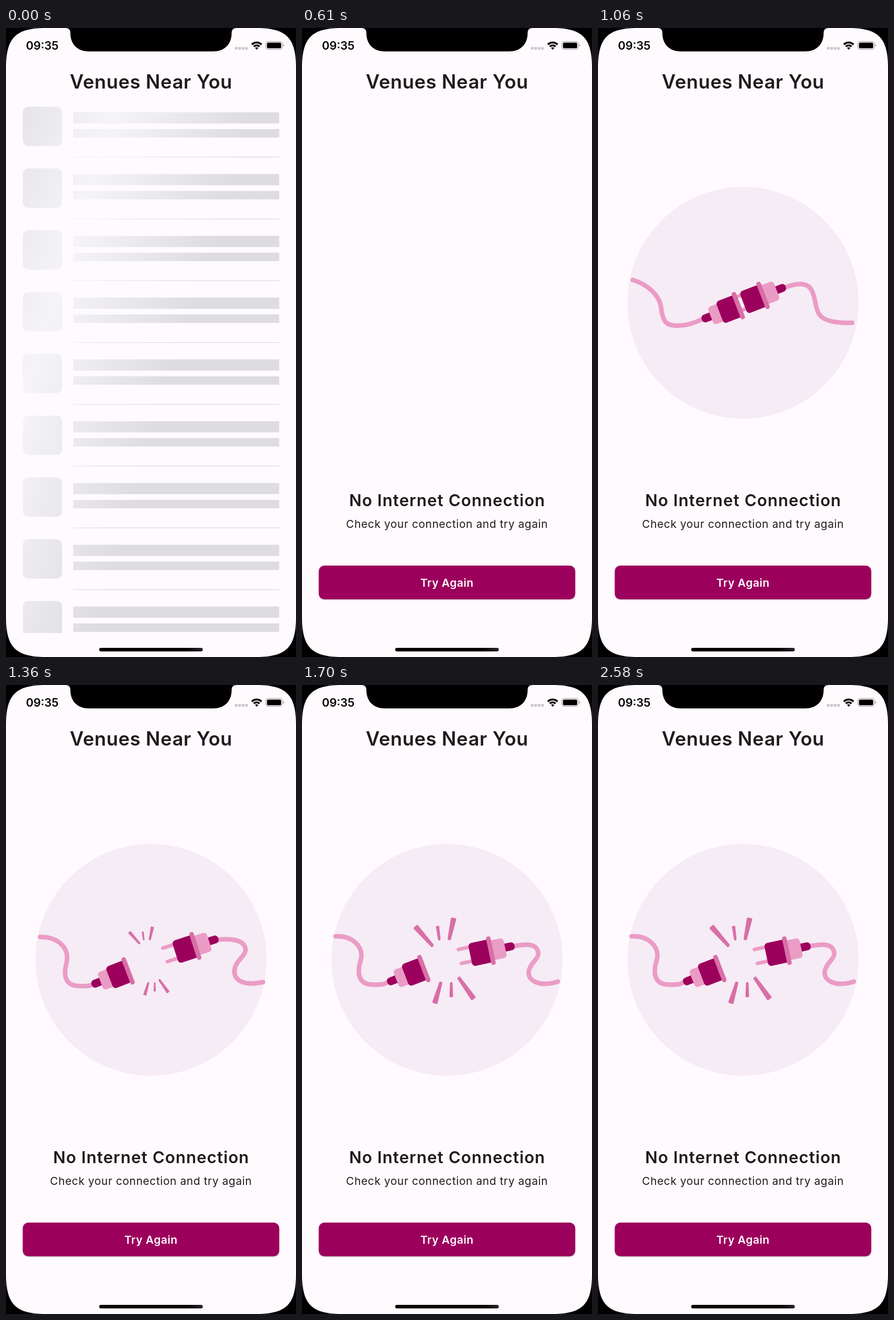
Write an HTML page that moves like this. It is 509x1101 px and loops after 2.67 s.

```html
<!DOCTYPE html>
<html lang="en">
<head>
<meta charset="utf-8">
<title>Venues</title>
<style>
  html, body { margin: 0; width: 100%; height: 100%; overflow: hidden; background: #000; }
  svg { display: block; width: 100%; height: 100%; }
  text { font-family: Inter, Roboto, sans-serif; font-optical-sizing: none; font-weight: 600; fill: #1f1a1d; }
  .mid { text-anchor: middle; }
  .dark { fill: #9c005d; }
  .light { fill: #ea9cc5; }
  .rose { fill: #d86fa7; }
  .cable { fill: none; stroke: #ea9cc5; stroke-width: 8; stroke-linecap: round; }
  .button { filter: drop-shadow(0 1.3px 1.3px rgba(0, 0, 0, .28)); }
</style>
</head>
<body>
<svg viewBox="0 0 509 1101" preserveAspectRatio="none">
  <defs>
    <linearGradient id="shimmer" gradientUnits="userSpaceOnUse" x1="-14" y1="0" x2="436.7" y2="139.7">
      <stop offset="0" stop-color="#dddcde"/>
      <stop offset=".5" stop-color="#f5f4f6"/>
      <stop offset="1" stop-color="#dddcde"/>
    </linearGradient>
    <linearGradient id="bar">
      <stop offset=".85" stop-color="#000"/>
      <stop offset="1" stop-color="#29262b"/>
    </linearGradient>
    <clipPath id="list"><rect x="0" y="120" width="509" height="939"/></clipPath>
  </defs>

  <rect width="509" height="1101"/>
  <path fill="#fffafe" d="M0 70C0 17 17 0 70 0H439C492 0 509 17 509 70V1031C509 1084 492 1101 439 1101H70C17 1101 0 1084 0 1031Z"/>
  <path d="M104 0C110 0 113 3 113 9C113 28 125 41 146 41H363C384 41 396 28 396 9C396 3 399 0 405 0Z"/>

  <text x="35" y="37.6" font-size="20" style="fill:#000">09:35</text>
  <g id="signal" fill="#cbc7cb"></g>
  <g fill="none" stroke="#000" stroke-width="3.2">
    <path d="M431.5 29A12 12 0 0 1 448.5 29"/>
    <path d="M434.9 32.4A7.2 7.2 0 0 1 445.1 32.4"/>
  </g>
  <path d="M440 38L437.2 34.9A3.8 3.8 0 0 1 442.8 34.9Z"/>
  <rect x="456" y="23.5" width="29" height="14" rx="4.2" fill="none" stroke="#a5a2a5" stroke-width="1.2"/>
  <rect x="458" y="25.4" width="25" height="10.2" rx="2.6"/>
  <path fill="#a5a2a5" d="M486.5 28.2Q488.4 29 488.4 30.5Q488.4 32 486.5 32.8Z"/>

  <text class="mid" x="254.7" y="106" font-size="33.4" letter-spacing=".55">Venues Near You</text>
  <rect x="163.5" y="1085" width="182" height="6.2" rx="3.1" fill="url(#bar)"/>

  <g id="skeleton" fill="url(#shimmer)" clip-path="url(#list)"></g>

  <g id="error">
    <g id="art">
      <circle cx="254.5" cy="481" r="203" fill="#f6ecf5"/>
      <path id="cableL" class="cable"/>
      <path id="cableR" class="cable"/>
      <g id="prongs" class="light">
        <rect x="-58.5" y="-17.2" width="30" height="6.4" rx="3.2"/>
        <rect x="-58.5" y="7.8" width="30" height="6.4" rx="3.2"/>
      </g>
      <g id="plugL">
        <rect class="dark" x="-68.5" y="-7" width="24" height="14" rx="6"/>
        <rect class="light" x="-52" y="-16.5" width="26" height="33" rx="5.5"/>
        <rect class="dark" x="-35" y="-20.5" width="35" height="41" rx="6"/>
        <rect class="rose" x="-4" y="-25.3" width="8" height="50.6" rx="4"/>
      </g>
      <g id="plugR">
        <rect class="dark" x="20" y="-7" width="22.5" height="14" rx="6"/>
        <rect class="light" x="-4" y="-17.5" width="29.5" height="35" rx="5.5"/>
        <rect class="dark" x="-37" y="-20.5" width="37" height="41" rx="6"/>
        <rect class="rose" x="-4" y="-25.3" width="8" height="50.6" rx="4"/>
      </g>
      <g id="sparksTop" class="rose"></g>
      <g id="sparksLow" class="rose"></g>
    </g>
    <text class="mid" x="255" y="837" font-size="28.7" letter-spacing="1">No Internet Connection</text>
    <text class="mid" x="254.5" y="875" font-size="19.2" letter-spacing=".57" style="font-weight:400">Check your connection and try again</text>
    <rect class="dark button" x="29.5" y="941" width="450" height="59" rx="9.8"/>
    <text class="mid" x="254.5" y="977.6" font-size="19.2" letter-spacing=".5" style="fill:#fff">Try Again</text>
  </g>
</svg>
<script>
const LOOP = 2670, ERROR_AT = 610, ART_AT = 640;
const $ = id => document.getElementById(id);

function add(parent, tag, attrs) {
  const el = document.createElementNS('http://www.w3.org/2000/svg', tag);
  for (const k in attrs) el.setAttribute(k, attrs[k]);
  parent.appendChild(el);
}
const box = (parent, x, y, width, height, rx = 0) =>
  add(parent, 'rect', { x, y, width, height, rx });

for (let i = 0; i < 4; i++) box($('signal'), 401.6 + i * 6, 33.2, 4.7, 4.7, 1);

for (let i = 0; i < 9; i++) {
  const y = 137.7 + i * 108.15, rows = $('skeleton');
  box(rows, 29.5, y, 69, 68.9, 9.8);
  box(rows, 118, y + 9.8, 361.5, 19.6);
  box(rows, 118, y + 39.3, 361.5, 14.8);
  box(rows, 118, y + 87.7, 361.5, 1.3);
}

// Tapered ray with round ends, wide at (x1, y1).
function ray(parent, x1, y1, x2, y2, w1, w2) {
  const len = Math.hypot(x2 - x1, y2 - y1);
  const nx = (y1 - y2) / len, ny = (x2 - x1) / len;
  const at = (x, y, w) => `${x + nx * w} ${y + ny * w}`;
  add(parent, 'path', {
    d: `M${at(x1, y1, w1)}L${at(x2, y2, w2)}L${at(x2, y2, -w2)}L${at(x1, y1, -w1)}Z`,
    stroke: '#d86fa7', 'stroke-width': 4, 'stroke-linejoin': 'round'
  });
}
ray($('sparksTop'), 200, 424, 228.5, 456, 2.8, 1);
ray($('sparksTop'), 238, 423.5, 241, 445, 1, .2);
ray($('sparksTop'), 266, 409.5, 258.5, 444.5, 2.8, 1);
ray($('sparksLow'), 233.5, 555.5, 243.5, 521.5, 2.8, .8);
ray($('sparksLow'), 262, 544.5, 262, 522, 1.2, .3);
ray($('sparksLow'), 300.5, 548, 275.5, 513, 2.8, 1);

// Plugs: collar x, y, angle. Cables: one smooth path each.
const poses = [
  { t: 820, L: [258.7, 480.5, -21], R: [298.7, 465, -21],
    cL: 'M65 446C92 446 104 470 113 491S126 518 148 518S180 512 197 504',
    cR: 'M338 451C358 444 376 443 384 459S384 482 390 496S420 517 446 518' },
  { t: 1060, L: [246.3, 486, -21], R: [289.7, 468, -21],
    cL: 'M61 441C84 448 108 465 111 491S122 521 140 521S171 515 185 509',
    cR: 'M329 454C349 446 368 445 375 459S380 482 386 497S415 517 446 516' },
  { t: 1350, L: [214.3, 500.5, -21], R: [332.3, 456.7, -18],
    cL: 'M60 441C90 441 113 459 106 487S108 527 130 527S146 526 153 524',
    cR: 'M371 446C395 443 416 446 420 460S402 481 401 500S421 527 451 520' },
  { t: 1670, L: [213.8, 496.3, -21], R: [331.5, 465, -12],
    cL: 'M59 440C88 438 110 459 103 482S99 524 124 524.5S145 522 152 519.5',
    cR: 'M372 457C392 453 410 452 414 466S400 485 398 502S419 529 449 519' }
];

const smooth = (t, a, b) => {
  const k = Math.min(1, Math.max(0, (t - a) / (b - a)));
  return k * k * (3 - 2 * k);
};
const mix = (a, b, k) => a + (b - a) * k;
const place = ([x, y, r]) => `translate(${x} ${y}) rotate(${r})`;
const mixPath = (a, b, k) => {
  const to = b.match(/[\d.]+/g);
  let i = 0;
  return a.replace(/[\d.]+/g, n => mix(+n, +to[i++], k).toFixed(2));
};

function draw(t) {
  const failed = t >= ERROR_AT;
  $('skeleton').style.display = failed ? 'none' : '';
  $('error').style.display = failed ? '' : 'none';
  $('art').style.display = t >= ART_AT ? '' : 'none';
  if (t < ART_AT) return;

  let i = 0;
  while (i < poses.length - 2 && t >= poses[i + 1].t) i++;
  const a = poses[i], b = poses[i + 1], k = smooth(t, a.t, b.t);
  const plug = side => place(a[side].map((v, j) => mix(v, b[side][j], k)));
  $('plugL').setAttribute('transform', plug('L'));
  $('plugR').setAttribute('transform', plug('R'));
  $('prongs').setAttribute('transform', plug('R'));
  $('cableL').setAttribute('d', mixPath(a.cL, b.cL, k));
  $('cableR').setAttribute('d', mixPath(a.cR, b.cR, k));

  const s = smooth(t, 1190, 1490);
  const grow = (id, x, y) => {
    $(id).style.display = s > 0 ? '' : 'none';
    $(id).setAttribute('transform', `translate(${x} ${y}) scale(${s}) translate(${-x} ${-y})`);
  };
  grow('sparksTop', 243, 447);
  grow('sparksLow', 259.5, 521);
}

const start = performance.now();
function tick() {
  draw((performance.now() - start) % LOOP);
  requestAnimationFrame(tick);
}
tick();
</script>
</body>
</html>
```
